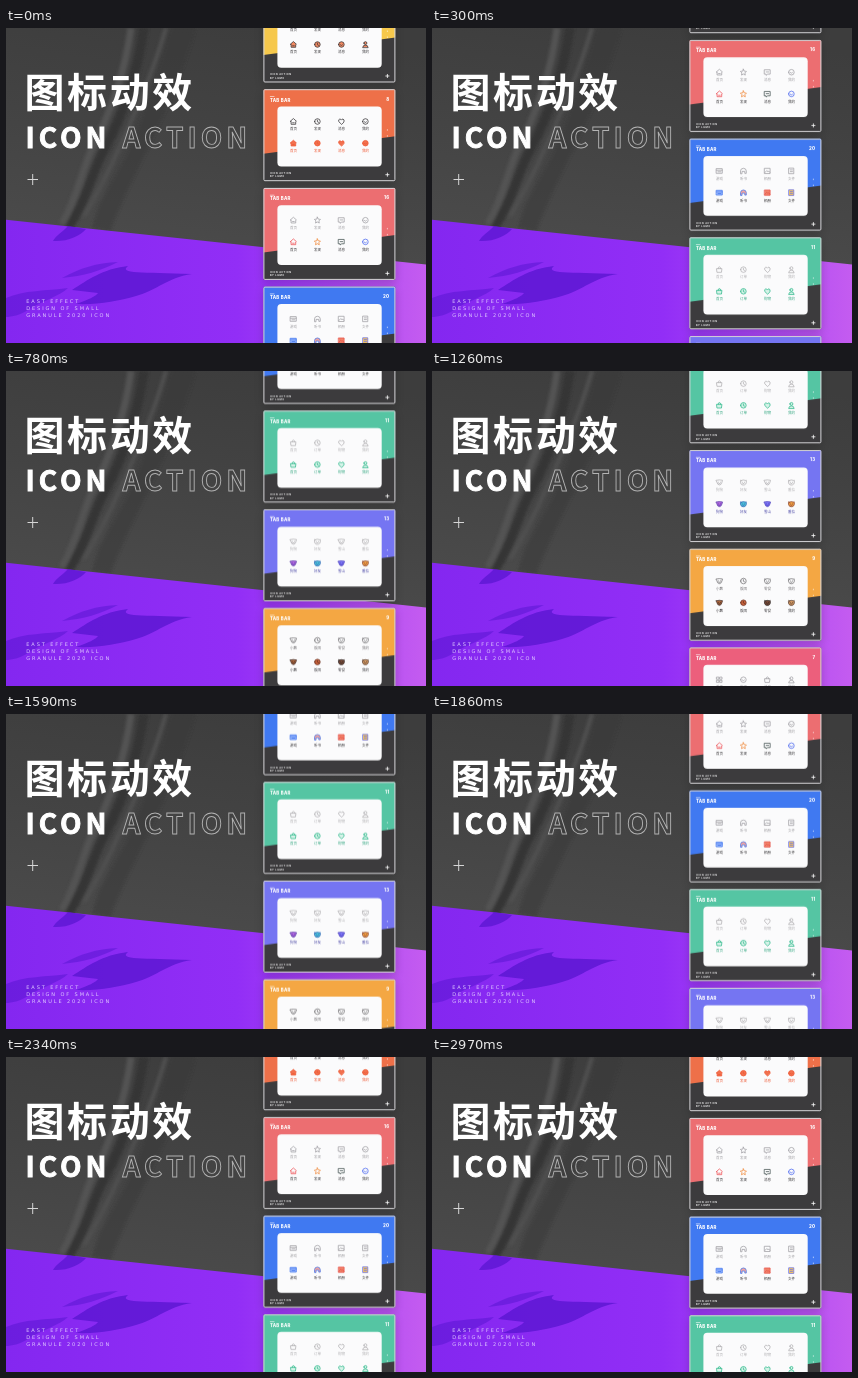
These frames come from a looping animation (420x315 px, 3 s). An HTML page:

```html
<!DOCTYPE html>
<html lang="zh-CN">
<head>
<meta charset="utf-8">
<title>图标动效</title>
<style>
  html, body { margin: 0; width: 100%; height: 100%; overflow: hidden; background: #424242; }
  svg { display: block; }
  .cjk { font-family: "Noto Sans CJK SC", "Noto Sans CJK", sans-serif; }
  .title { font-size: 40px; font-weight: 700; letter-spacing: 2.6px; fill: #fff; }
  .latin { font-size: 28px; font-weight: 900; letter-spacing: 4px; fill: #fff; stroke: #fff; stroke-width: .9; }
  .hollow { fill: none; stroke: #b4b4b4; }
  .note { font: 5px "DejaVu Sans", sans-serif; letter-spacing: 1.9px; fill: #e0ccff; }
  .card text { fill: #fff; font-family: Inter, sans-serif; }
  .card .head { font-size: 4.4px; font-weight: 800; letter-spacing: .25px; }
  .card .tiny { font-size: 2.5px; font-weight: 600; letter-spacing: .45px; }
  .card .label { font: 500 3.5px "Noto Sans CJK SC", "Noto Sans CJK", sans-serif; text-anchor: middle; fill: var(--c); }
  .icon { fill: none; stroke: var(--c); stroke-width: .95; stroke-linejoin: round; stroke-linecap: round; }
  .icon.solid { fill: var(--f); }
  #reel { animation: scroll 3s infinite; }

  @keyframes scroll {
    0%   { transform: translateY(-37px);    animation-timing-function: cubic-bezier(.333, .34, .667, .687); }
    10%  { transform: translateY(-185px);   animation-timing-function: cubic-bezier(.333, .433, .667, .774); }
    26%  { transform: translateY(-355px);   animation-timing-function: cubic-bezier(.333, .656, .667, 1); }
    42%  { transform: translateY(-414.5px); animation-timing-function: cubic-bezier(.333, 0, .667, .69); }
    62%  { transform: translateY(-220px);   animation-timing-function: cubic-bezier(.333, .588, .667, .98); }
    78%  { transform: translateY(-137.4px); animation-timing-function: ease-out; }
    99%, 100% { transform: translateY(-136.5px); }
  }
</style>
</head>
<body>
<svg width="420" height="315" viewBox="0 0 420 315">
  <defs>
    <linearGradient id="wall" x1=".6" y1="0" x2=".4" y2="1">
      <stop offset="0" stop-color="#3d3d3d"/>
      <stop offset=".35" stop-color="#434343"/>
      <stop offset=".7" stop-color="#4a4a4a"/>
    </linearGradient>
    <linearGradient id="floor" x1="0" x2="1">
      <stop offset="0" stop-color="#8427f0"/>
      <stop offset=".55" stop-color="#922ef6"/>
      <stop offset=".75" stop-color="#a843f5"/>
      <stop offset="1" stop-color="#c45cf0"/>
    </linearGradient>
    <filter id="soft" x="-20%" y="-20%" width="140%" height="140%"><feGaussianBlur stdDeviation="1.6"/></filter>
    <filter id="shade" x="-20%" y="-20%" width="140%" height="150%"><feGaussianBlur stdDeviation="5"/></filter>
    <clipPath id="face"><rect width="132" height="92" rx="1"/></clipPath>
  </defs>

  <rect width="420" height="315" fill="url(#wall)"/>
  <g filter="url(#soft)" fill="none">
    <path d="M165 0C150 48 138 92 116 135 102 160 92 174 86 200L104 204C124 150 168 80 190 0Z" fill="#373737" opacity=".5"/>
    <path d="M138 0C131 48 116 90 95 128 83 155 78 176 62 200" stroke="#343434" stroke-width="9"/>
    <path d="M125 0C119 45 105 85 84 125 74 150 70 172 56 196" stroke="#535353" stroke-width="7"/>
    <path d="M160 0C144 54 124 96 104 140 94 160 88 172 78 188" stroke="#505050" stroke-width="4"/>
  </g>
  <path d="M0 191.800L420 236.500V315H0Z" fill="url(#floor)"/>
  <g fill="#5714cf">
    <path d="M62 198L80 201C74 208 61 214 47 213 50 207 57 204 62 198Z" opacity=".7"/>
    <path d="M0 270C18 262 40 263 62 260 54 268 34 274 22 282 14 287 6 289 0 289Z" opacity=".5"/>
    <path d="M66 262C82 252 96 241 122 238 112 246 136 244 186 246 160 250 152 262 130 268 112 273 92 277 70 276 82 272 90 268 92 265Z" opacity=".75"/>
    <path d="M56 250C74 240 90 235 112 234 94 243 78 248 56 250Z" opacity=".5"/>
  </g>

  <text class="cjk title" x="18.500" y="79">图标动效</text>
  <text class="cjk latin" x="19.500" y="120.300">ICON</text>
  <text class="cjk latin hollow" x="116.500" y="120.300">ACTION</text>
  <path d="M21.500 151.500H32M26.700 146V157" stroke="#d5d5d5" fill="none"/>
  <text class="note" x="20.300" y="274.600">EAST EFFECT</text>
  <text class="note" x="20.300" y="282">DESIGN OF SMALL</text>
  <text class="note" x="20.300" y="289.400">GRANULE 2020 ICON</text>

  <g id="reel"></g>
</svg>
<script>
  const PITCH = 98.7, LEFT = 257.4;
  const INK = '#3a383b', GREY = '#a3a2a6';

  // Icon outlines centred on 0,0, about 8 units wide
  const ring = r => `M${-r} 0a${r} ${r} 0 1 0 ${2 * r} 0a${r} ${r} 0 1 0 ${-2 * r} 0Z`;
  const shapes = {
    home: 'M-3.600 -.4L0 -3.600 3.600 -.4 2.800 .2V3.400H-2.800V.2ZM-1 1.600H1',
    star: 'M0 -3.700L1.100 -1.300 3.700 -1 1.800 .9 2.300 3.500 0 2.200 -2.300 3.500 -1.800 .9 -3.700 -1 -1.100 -1.300Z',
    chat: 'M-3.400 -3H3.400V2.300H.4L-1.600 3.800V2.300H-3.400ZM-1.500 -.3H1.500',
    ring: ring(3.4) + 'M-1.300 .5Q0 2.200 1.300 .5',
    clock: ring(3.4) + 'M0 -1.700V.3L1.400 1',
    heart: 'M0 3.300L-3.200 .2Q-4 -2.600 -1.900 -3 -.6 -3 0 -1.700 .6 -3 1.900 -3 4 -2.600 3.200 .2Z',
    cal: 'M-3.500 -2.800H3.500V2.900H-3.500ZM-3.500 -.8H3.500M-1.800 1.100H1.800',
    arch: 'M-3.500 3V0Q-3.300 -3.200 0 -3.200 3.300 -3.200 3.500 0V3H1.700V.6H-1.700V3Z',
    pic: 'M-3.300 -3.200H3.300V3.200H-3.300ZM-3 2L-.8 -.4 .7 1 1.700 .2 3 1.800',
    doc: 'M-2.900 -3.400H2.900V3.400H-2.900ZM-1.300 -1.200H1.300M-1.300 .9H1.300',
    bag: 'M-3.100 -1.200H3.100L2.500 3.300H-2.500ZM-1.600 -1.200Q-1.500 -3.400 0 -3.400 1.500 -3.400 1.600 -1.200',
    user: 'M-1.800 -1.700a1.800 1.800 0 1 0 3.600 0a1.800 1.800 0 1 0 -3.600 0ZM-3.300 3.400Q-3 .7 0 .7 3 .7 3.300 3.400Z',
    pup: 'M-3.800 -2.500L-1.800 -2.700Q0 -3.200 1.800 -2.700L3.800 -2.500 3 .1Q2.400 3.100 0 3.200 -2.400 3.100 -3 .1ZM-1.300 -.2V.1M1.300 -.2V.1M-.6 1.500H.6',
    bear: 'M-2.600 -2.300Q-3.500 -3.800 -3.600 -1.600 -3.900 3.300 0 3.300 3.900 3.300 3.600 -1.600 3.500 -3.800 2.600 -2.300 0 -3.500 -2.600 -2.300ZM-1.300 -.1V.2M1.300 -.1V.2M-.6 1.500H.6',
    grid: 'M-3.200 -3.200H-.6V-.6H-3.200ZM.7 -3.200H3.200V-.6H.7ZM-3.200 .7H-.6V3.200H-3.200ZM.7 .7H3.200V3.200H.7Z'
  };

  const tabs = '首页 发现 消息 我的';
  const all = color => Array(4).fill(color);
  // top: first row colour; ink: second row outlines; fill: second row fills
  const cards = [
    { bg: '#f6c84c', no: '6', icons: 'home clock ring user', words: tabs, top: INK,
      ink: all(INK), fill: all('#f28a62') },
    { bg: '#ee7049', no: '8', icons: 'home clock heart ring', words: tabs, top: INK,
      ink: all('#ee5a36'), fill: all('#f2704e'), text: '#ee5a36' },
    { bg: '#ec6e71', no: '16', icons: 'home star chat ring', words: tabs, top: GREY,
      ink: ['#ee5358', '#f08a3c', '#4b5a58', '#4f6cf0'], text: INK },
    { bg: '#4079f1', no: '20', icons: 'cal arch pic doc', words: '游戏 听书 相册 文件', top: GREY,
      ink: ['#3f74ee', '#4a78e8', '#e8574e', '#6a70ea'], fill: ['#a9c4ff', '#f4a6a0', '#f0836a', '#f8c95c'], text: INK },
    { bg: '#55c5a3', no: '11', icons: 'bag clock heart user', words: '首页 订单 购物 我的', top: '#b3b2b5',
      ink: all('#36bb90'), fill: all('#d5f3e8'), text: '#36a983' },
    { bg: '#7575f2', no: '13', icons: 'pup bear pup bear', words: '狗狗 好友 雪山 番茄', top: '#b3b2b5',
      ink: ['#5a3aa8', '#3569b8', '#4a3fc0', '#8b4a3a'], fill: ['#b56ae0', '#4cc3d8', '#7f78f5', '#f3a142'], text: '#4d4aa8' },
    { bg: '#f4a743', no: '9', icons: 'pup clock bear bear', words: '小熊 饭团 零食 我的', top: '#767477',
      ink: ['#47302a', '#6b3426', '#332c2c', '#5a4034'], fill: ['#a8643c', '#c8623a', '#7a4a36', '#d49a62'], text: INK },
    { bg: '#ec5f7c', no: '7', icons: 'grid ring bag user', words: tabs, top: GREY,
      ink: all('#ec4f70'), text: INK }
  ];

  const icon = (name, x, y, color, fill) =>
    `<path class="icon ${fill ? 'solid' : ''}" style="--c:${color};--f:${fill}" transform="translate(${x} ${y}) scale(.82)" d="${shapes[name]}"/>`;
  const label = (word, x, y, color) =>
    `<text class="label" style="--c:${color}" x="${x}" y="${y}">${word}</text>`;

  function drawCard(card, i) {
    const words = card.words.split(' ');
    const items = card.icons.split(' ').map((name, n) => {
      const x = 30 + 24 * n;
      return icon(name, x, 32.3, card.top)
        + label(words[n], x, 41, card.top)
        + icon(name, x, 54, card.ink[n], card.fill && card.fill[n])
        + label(words[n], x, 63, card.text || INK);
    }).join('');
    return `<g class="card" transform="translate(${LEFT} ${PITCH * i})">
      <rect y="2" width="132" height="93" opacity=".18" filter="url(#shade)"/>
      <g clip-path="url(#face)">
        <rect width="132" height="92" fill="#3c3b3d"/>
        <path d="M0 0H132V47L0 64.500Z" fill="${card.bg}"/>
      </g>
      <rect x=".5" y=".5" width="131" height="91" rx="1" fill="none" stroke="#d6d5d8"/>
      <path d="M6.500 7.300H11" stroke="#fff" stroke-width=".8" opacity=".75"/>
      <text class="head" x="6.500" y="12.500">TAB BAR</text>
      <text class="head" x="126" y="11.500" text-anchor="end">${card.no}</text>
      <rect x="14" y="17.400" width="104.300" height="59.800" rx="4" fill="#fbfbfc"/>
      ${items}
      <text class="tiny" x="6.500" y="85">ICON ACTION</text>
      <text class="tiny" x="6.500" y="88.300">BY LUMO</text>
      <path d="M122 85.500H126M124 83.500V87.500" stroke="#fff" stroke-width=".8"/>
      <path d="M124 40V41.500M124 46V47.500" stroke="#fff" stroke-width=".8" opacity=".7"/>
    </g>`;
  }

  document.getElementById('reel').innerHTML = cards.map(drawCard).join('');
</script>
</body>
</html>
```
